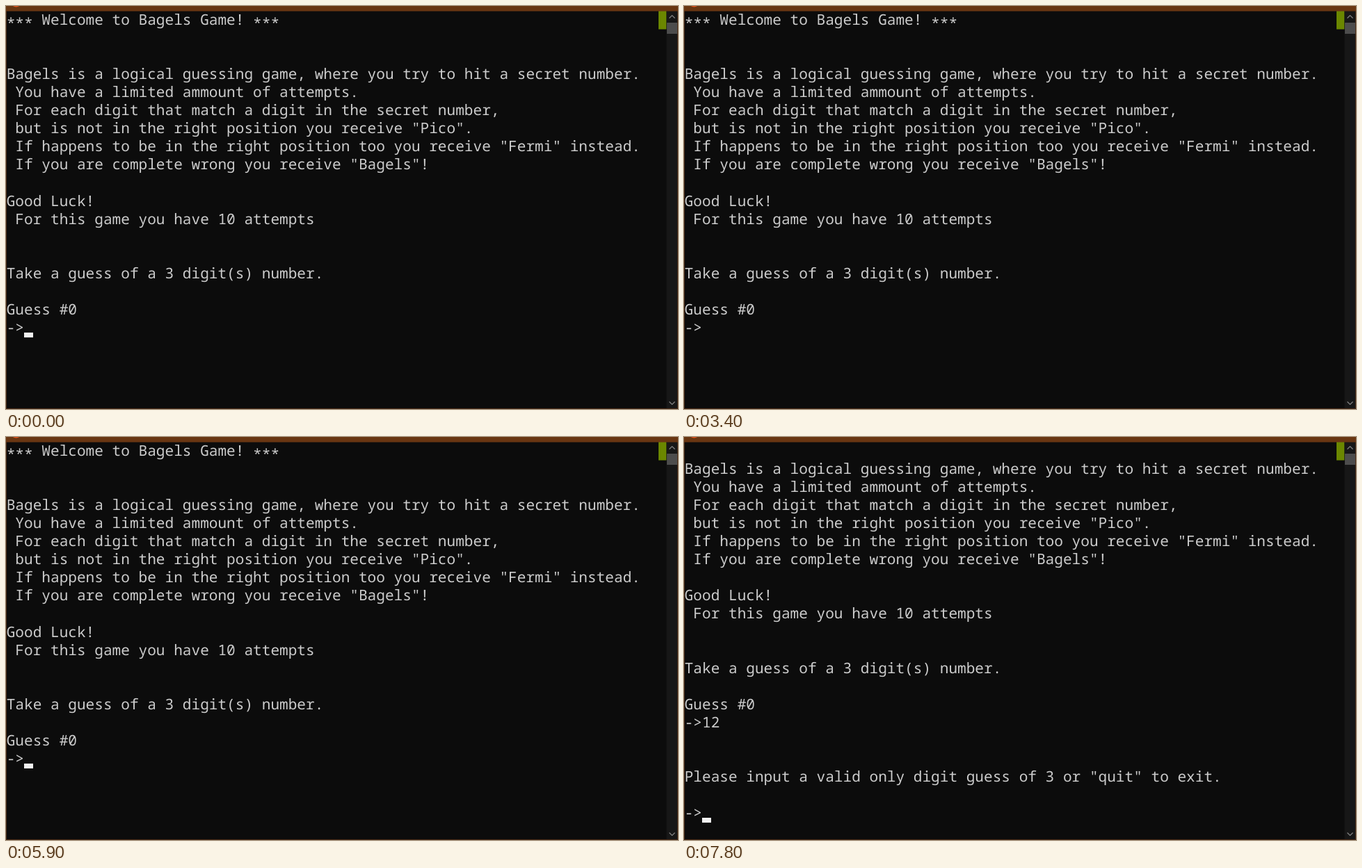
Recreate the animation shown at these times as an HTML page. Size 966 px wide and 580 px high, loop 8 s.

```html
<!DOCTYPE html>
<html lang="en">
<head>
<meta charset="utf-8">
<title>Bagels Game</title>
<style>
  html, body { margin: 0; width: 100%; height: 100%; overflow: hidden; background: #0c0c0c; }
  svg { display: block; }
  text {
    font: 21.1px "Noto Sans Mono", "DejaVu Sans Mono", monospace;
    fill: #ccc;
    font-variant-ligatures: none;
    text-rendering: geometricPrecision;
  }
</style>
</head>
<body>
<svg width="966" height="580" viewBox="0 0 966 580">
  <rect width="966" height="580" fill="#0c0c0c"/>
  <g id="page"></g>
  <rect id="cursor" width="13" height="7" fill="#f2f2f2"/>
  <rect x="938" y="7" width="11.5" height="26.5" fill="#6b8700"/>
  <rect x="949.5" y="7" width="16" height="573" fill="#171717"/>
  <rect x="950" y="24" width="15" height="16" fill="#4d4d4d"/>
  <g fill="none" stroke="#868686" stroke-width="1.2">
    <path d="M953.5 17.5l4-4 4 4"/>
    <path d="M953.5 569.5l4 4 4-4"/>
  </g>
  <path d="M.5 7V579.5H965.5V7" fill="none" stroke="#4a2a14"/>
  <rect width="966" height="7.5" fill="#693612"/>
  <circle cx="14.5" cy="-6.5" r="8" fill="#e8541c"/>
</svg>
<script>
const LOOP = 8000, LEFT = 0.7, ADVANCE = 12.66, ROW = 26.05, BASE = 27, SCROLL_ROWS = 2;

const lines = {
  0: "*** Welcome to Bagels Game! ***",
  3: "Bagels is a logical guessing game, where you try to hit a secret number.",
  4: " You have a limited ammount of attempts.",
  5: " For each digit that match a digit in the secret number,",
  6: " but is not in the right position you receive \"Pico\".",
  7: " If happens to be in the right position too you receive \"Fermi\" instead.",
  8: " If you are complete wrong you receive \"Bagels\"!",
  10: "Good Luck!",
  11: " For this game you have 10 attempts",
  14: "Take a guess of a 3 digit(s) number.",
  16: "Guess #0",
  17: "->",
  20: "Please input a valid only digit guess of 3 or \"quit\" to exit.",
  22: "->"
};
const PROMPT = 17, REPLY = 20, NEXT_PROMPT = 22;

const blinks = [500, 1100, 1500, 2000, 2500, 3000, 3400, 3900, 4400, 4900, 5500, 5900, 7300, 7800];
const keys = [6100, 6400];
const ENTER = 6600;

const page = document.getElementById("page");
const cursor = document.getElementById("cursor");
const rows = {};

function svgNode(tag, attrs, parent, text) {
  const node = document.createElementNS("http://www.w3.org/2000/svg", tag);
  for (const name in attrs) node.setAttribute(name, attrs[name]);
  if (text) node.textContent = text;
  return parent.appendChild(node);
}

for (const [row, line] of Object.entries(lines)) {
  const body = line.trimStart();
  const x = LEFT + (line.length - body.length) * ADVANCE;
  const node = rows[row] = svgNode("text", { x, y: BASE + row * ROW }, page);
  // Asterisks sit on the middle of the line.
  let shift = 0;
  for (const part of body.split(/(\*+)/).filter(Boolean)) {
    const drop = part[0] === "*" ? 4.5 : 0;
    svgNode("tspan", { dy: drop - shift }, node, part);
    shift = drop;
  }
}

const passed = (times, t) => times.filter(at => at <= t).length;
let last = "";

function draw(t) {
  const sent = t >= ENTER;
  const typed = passed(keys, t);
  const lit = passed(blinks, t) % 2 === 0;
  const state = [sent, typed, lit].join();
  if (state === last) return;
  last = state;

  rows[PROMPT].textContent = "->" + "12".slice(0, typed);
  for (const row of [REPLY, NEXT_PROMPT])
    rows[row].setAttribute("visibility", sent ? "visible" : "hidden");
  page.setAttribute("transform", `translate(0 ${sent ? -SCROLL_ROWS * ROW : 0})`);

  const row = sent ? NEXT_PROMPT - SCROLL_ROWS : PROMPT;
  const col = 2 + (sent ? 0 : typed);
  cursor.setAttribute("x", Math.round(LEFT + col * ADVANCE));
  cursor.setAttribute("y", Math.round(BASE + row * ROW));
  cursor.setAttribute("visibility", lit ? "visible" : "hidden");
}

const start = performance.now();
function tick() {
  draw((performance.now() - start) % LOOP);
  requestAnimationFrame(tick);
}
tick();
</script>
</body>
</html>
```
